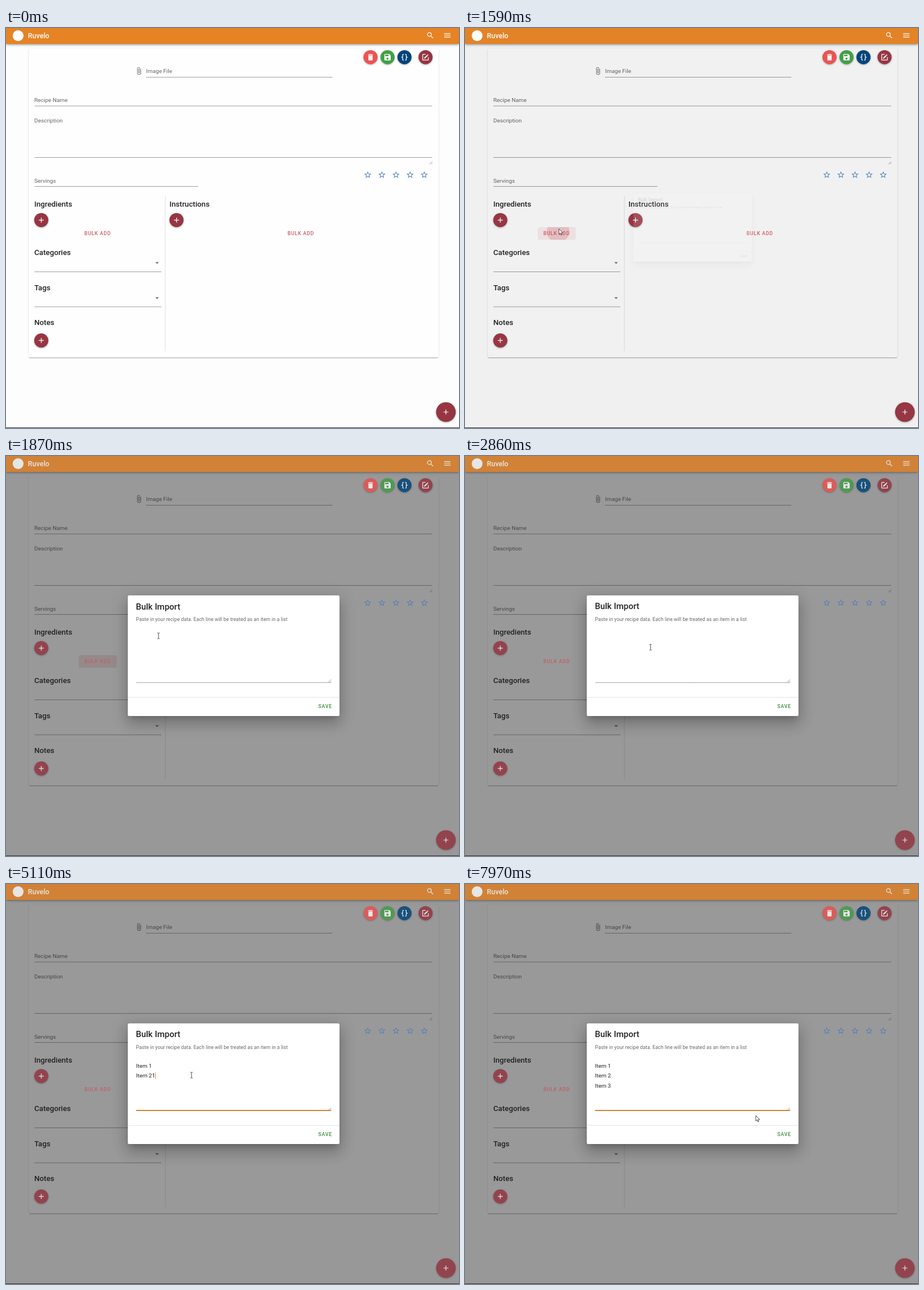
Animation of 796 by 703 pixels, one loop 8000 ms. Source, as an HTML page:

```html
<!DOCTYPE html>
<html lang="en">
<head>
<meta charset="utf-8">
<title>Bulk import</title>
<style>
html, body { margin: 0; width: 100%; height: 100%; overflow: hidden; background: #fdfdfd; }
body { position: relative; font-family: Roboto, sans-serif; }
body > *, #dialog > * { position: absolute; }
svg { left: 0; top: 0; overflow: visible; }
text { font-size: 9.92px; fill: rgba(0,0,0,.6); }
.heading { font-size: 13.2px; font-weight: 500; fill: rgba(0,0,0,.87); }
.button { font-size: 8.68px; font-weight: 500; letter-spacing: .0892em; fill: #d0585f; }
.rule { stroke: rgba(0,0,0,.38); }
.divider { stroke: rgba(0,0,0,.12); }
.fab { filter: drop-shadow(0 1.8px 1.8px rgba(0,0,0,.32)); }
#card { left: 40px; top: 36px; width: 720px; height: 543px; border-radius: 2.5px; background: #fefefe;
  box-shadow: 0 2px .6px -1.2px rgba(0,0,0,.2), 0 1.2px 1.2px rgba(0,0,0,.14), 0 .6px 3px rgba(0,0,0,.12); }
#scrim { inset: 0; background: #212121; }
#vivid { left: 0; top: 0; width: 796px; height: 703px; }
#bar { position: absolute; width: 796px; height: 28px; background: #e58325;
  box-shadow: 0 1.2px 2.5px -.6px rgba(0,0,0,.2), 0 2.5px 3px rgba(0,0,0,.14), 0 .6px 6px rgba(0,0,0,.12); }
#vivid svg { position: absolute; }
#dialog { left: 213.8px; top: 244.8px; width: 372px; height: 212px; border-radius: 2.5px; background: #fff;
  box-shadow: 0 6.8px 9.3px -4.3px rgba(0,0,0,.2), 0 15px 23.5px 2px rgba(0,0,0,.14), 0 5.6px 28.5px 5px rgba(0,0,0,.12); }
#typed { left: 14.7px; top: 66.2px; font-size: 9.92px; line-height: 17.36px; white-space: pre; color: rgba(0,0,0,.87); }
#caret { display: inline-block; position: relative; top: -.7px; width: .8px; height: 12px; margin-right: -.8px;
  vertical-align: middle; background: #d9935c; }
</style>
</head>
<body>
<div id="card"></div>
<svg id="page" width="796" height="703"></svg>
<div id="scrim"></div>
<div id="vivid"><div id="bar"></div><svg id="controls" width="796" height="703"></svg></div>
<div id="dialog">
  <svg id="form" width="372" height="212" viewBox="213.8 244.8 372 212"></svg>
  <div id="typed"><span id="text"></span><span id="caret"></span></div>
</div>
<svg id="top" width="796" height="703">
  <rect y="702" width="796" height="1" fill="#39353b"/>
  <g id="cursor" stroke-linejoin="round">
    <path id="arrow" d="M0 0V9.6L2.2 7.6L3.8 11L5.3 10.4L3.8 7.1H6.9Z" fill="#fff" stroke="#222" stroke-width=".8"/>
    <path id="beam" d="M-2-5H-.6L0-4.4L.6-5H2M0-4.4V4.4M-2 5H-.6L0 4.4L.6 5H2" fill="none" stroke="#333" stroke-width=".9"/>
  </g>
</svg>
<script>
const LOOP = 8000;
const $ = id => document.getElementById(id);

const ICONS = {
  search: 'M9.5 3A6.5 6.5 0 0 1 16 9.5C16 11.11 15.41 12.59 14.44 13.73L14.71 14H15.5L20.5 19L19 20.5L14 15.5V14.71L13.73 14.44A6.5 6.5 0 1 1 9.5 3M9.5 5A4.5 4.5 0 1 0 9.5 14A4.5 4.5 0 1 0 9.5 5Z',
  menu: 'M3 6H21V8H3ZM3 11H21V13H3ZM3 16H21V18H3Z',
  trash: 'M19 4H15.5L14.5 3H9.5L8.5 4H5V6H19M6 19A2 2 0 0 0 8 21H16A2 2 0 0 0 18 19V7H6Z',
  disk: 'M15 9H5V5H15M12 19A3 3 0 0 1 12 13A3 3 0 0 1 12 19M17 3H5A2 2 0 0 0 3 5V19A2 2 0 0 0 5 21H19A2 2 0 0 0 21 19V7Z',
  braces: 'M8 3A2 2 0 0 0 6 5V9A2 2 0 0 1 4 11H3V13H4A2 2 0 0 1 6 15V19A2 2 0 0 0 8 21H10V19H8V14A2 2 0 0 0 6 12A2 2 0 0 0 8 10V5H10V3M16 3A2 2 0 0 1 18 5V9A2 2 0 0 0 20 11H21V13H20A2 2 0 0 0 18 15V19A2 2 0 0 1 16 21H14V19H16V14A2 2 0 0 1 18 12A2 2 0 0 1 16 10V5H14V3Z',
  edit: 'M5 3A2 2 0 0 0 3 5V19A2 2 0 0 0 5 21H19A2 2 0 0 0 21 19V12H19V19H5V5H12V3ZM17.3 4.2L16.08 5.41L18.58 7.91L19.8 6.7Q20.2 6.2 19.8 5.75L18.25 4.2Q17.8 3.8 17.3 4.2M15.37 6.12L8 13.5V16H10.5L17.87 8.62Z',
  clip: 'M16.5 6V17.5A4 4 0 0 1 8.5 17.5V5A2.5 2.5 0 0 1 13.5 5V15.5A1 1 0 0 1 11.5 15.5V6H10V15.5A2.5 2.5 0 0 0 15 15.5V5A4 4 0 0 0 7 5V17.5A5.5 5.5 0 0 0 18 17.5V6Z',
  star: 'M12 15.39L8.24 17.66L9.23 13.38L5.91 10.5L10.29 10.13L12 6.09L13.71 10.13L18.09 10.5L14.77 13.38L15.76 17.66ZM22 9.24L14.81 8.63L12 2L9.19 8.63L2 9.24L7.45 13.97L5.82 21L12 17.27L18.18 21L16.54 13.97Z',
  plus: 'M19 13H13V19H11V13H5V11H11V5H13V11H19Z',
  down: 'M7 10L12 15L17 10Z'
};

const icon = (name, x, y, fill) =>
  `<path d="${ICONS[name]}" fill="${fill}" transform="translate(${x} ${y}) scale(.62) translate(-12 -12)"/>`;
const fab = (x, y, color, name, r = 12.4) =>
  `<circle class="fab" cx="${x}" cy="${y}" r="${r}" fill="${color}"/>` + icon(name, x, y, '#fff');
const label = (x, y, text, cls = '') => `<text x="${x}" y="${y}" class="${cls}">${text}</text>`;
const rule = (x1, x2, y) => `<path class="rule" d="M${x1} ${y}H${x2}"/>`;
const grip = (x, y) => `<path d="M${x - 5} ${y}l5-5M${x - 2} ${y}l2-2" stroke="#777" stroke-width=".7"/>`;

const MAROON = '#973542';

$('page').innerHTML =
  icon('clip', 233.6, 75.5, '#757575') +
  label(246.3, 79.3, 'Image File') + rule(246, 573.5, 86.5) +
  label(49.7, 130, 'Recipe Name') + rule(50, 749, 137) +
  label(49.7, 166.2, 'Description') + rule(50, 749, 227.5) + grip(749, 239.5) +
  label(49.7, 271.9, 'Servings') + rule(50, 338, 278.5) +
  '<path class="divider" d="M280 295V568"/>' +
  label(49.7, 313.7, 'Ingredients', 'heading') +
  label(287.2, 313.7, 'Instructions', 'heading') +
  label(49.7, 399.2, 'Categories', 'heading') + rule(50, 273, 428.5) + icon('down', 265.5, 412.7, '#666') +
  label(49.7, 460.8, 'Tags', 'heading') + rule(50, 273, 490) + icon('down', 265.5, 474.4, '#666') +
  label(49.7, 522.4, 'Notes', 'heading') +
  `<clipPath id="edge"><rect x="127.8" y="350" width="66.8" height="22.2" rx="2.5"/></clipPath>
   <g clip-path="url(#edge)" fill="#d0585f">
     <rect id="hover" x="127" y="349" width="69" height="25"/><circle id="ripple"/>
   </g>`;

$('controls').innerHTML =
  '<circle cx="21.3" cy="13.5" r="9.5" fill="#fff"/>' +
  '<text x="38.6" y="18" style="font-size:12.4px;font-weight:500;fill:#fff">Ruvelo</text>' +
  icon('search', 745.5, 13, '#fff') + icon('menu', 775.5, 13, '#fff') +
  fab(640.5, 51.3, '#ef5350', 'trash') + fab(670.4, 51.3, '#43a047', 'disk') +
  fab(700.2, 51.3, '#00457a', 'braces') + fab(737.2, 51.3, MAROON, 'edit') +
  [0, 1, 2, 3, 4].map(i => icon('star', 635.7 + 24.8 * i, 258, '#4a7ec0')).join('') +
  fab(62, 337.6, MAROON, 'plus') + fab(299.6, 337.6, MAROON, 'plus') + fab(62, 549.2, MAROON, 'plus') +
  fab(773, 675, MAROON, 'plus', 17.3) +
  label(137.7, 364.2, 'BULK ADD', 'button') + label(494.8, 364.2, 'BULK ADD', 'button');

$('form').innerHTML =
  '<text x="228" y="269.3" style="font-size:15px;font-weight:500;fill:rgba(0,0,0,.87)">Bulk Import</text>' +
  '<text x="228.3" y="290" style="font-size:8.68px;letter-spacing:.0071em">Paste in your recipe data. Each line will be treated as an item in a list</text>' +
  rule(228.5, 571, 398) + grip(571, 397.5) +
  '<path id="focus" stroke="#d67d24" stroke-width="1.7"/>' +
  '<path class="divider" d="M213.8 424H585.8"/>' +
  '<text id="save" x="548.6" y="443.2" class="button">SAVE</text>';

const clamp = v => Math.min(1, Math.max(0, v));
const span = (t, from, to) => clamp((t - from) / (to - from));
const smooth = v => v * v * (3 - 2 * v);
const mix = (a, b, k) => a + (b - a) * k;

function bezier(x1, y1, x2, y2) {
  const at = (a, b, u) => 3 * a * u * (1 - u) ** 2 + 3 * b * u * u * (1 - u) + u ** 3;
  return x => {
    let lo = 0, hi = 1;
    for (let i = 0; i < 20; i++) {
      const mid = (lo + hi) / 2;
      if (at(x1, x2, mid) < x) lo = mid; else hi = mid;
    }
    return x >= 1 ? 1 : at(y1, y2, lo);
  };
}
const swift = bezier(.25, .8, .25, 1);
const standard = bezier(.4, 0, .2, 1);

// time, x, y
const POINTER = [
  [10, 800, 706], [260, 537, 584], [470, 537, 584], [1260, 141, 354], [1440, 165, 353], [1680, 165, 353],
  [1870, 268, 316], [2040, 319, 307], [2140, 322, 312], [2530, 322, 312], [2820, 326, 336],
  [7720, 326, 336], [7970, 511, 407]
];
const KEYS = 'Item 1\nItem 21\b\nItem 3';
const KEY_TIMES = [3570, 3650, 3730, 3810, 3920, 4000, 4210, 4590, 4680, 4770, 4860, 4960, 5110, 5110,
  5540, 6030, 6330, 6480, 6560, 6630, 6780, 7030];
const CARET_OFF = [[0, 2870], [3410, 3570], [5650, 6030], [7570, LOOP]];

function pointerAt(t) {
  const i = POINTER.findIndex(p => p[0] > t);
  if (i < 1) return POINTER[i ? POINTER.length - 1 : 0].slice(1);
  const [a, b] = [POINTER[i - 1], POINTER[i]];
  const k = smooth(span(t, a[0], b[0]));
  return [mix(a[1], b[1], k), mix(a[2], b[2], k)];
}

function typedAt(t) {
  let text = '';
  KEY_TIMES.forEach((time, i) => {
    if (time <= t) text = KEYS[i] === '\b' ? text.slice(0, -1) : text + KEYS[i];
  });
  return text;
}

function set(id, attributes) {
  for (const name in attributes) $(id).setAttribute(name, attributes[name]);
}

function draw(t) {
  const open = swift(span(t, 1580, 1880));
  $('scrim').style.opacity = .46 * open;
  $('vivid').style.filter = `contrast(${1 - .2 * open})`;
  $('dialog').style.opacity = open;
  $('dialog').style.transform = `scale(${.5 + .5 * open})`;
  $('save').style.fill = `color-mix(in srgb, #388e3c ${100 * span(t, 1640, 1860)}%, #555)`;

  set('hover', { opacity: .1 * span(t, 1280, 1480) * (1 - span(t, 1600, 1900)) });
  const spread = standard(span(t, 1515, 1765));
  set('ripple', {
    cx: mix(165, 161.2, spread), cy: mix(355, 361, spread), r: 35.2 * (.3 + .7 * spread),
    opacity: .25 * span(t, 1515, 1560) * (1 - span(t, 1770, 2050))
  });

  const half = 171.3 * standard(span(t, 2860, 3160));
  set('focus', { d: half ? `M${399.7 - half} 397.6H${399.7 + half}` : '' });
  $('text').textContent = typedAt(t);
  $('caret').style.visibility = CARET_OFF.some(([a, b]) => t >= a && t < b) ? 'hidden' : 'visible';

  const [x, y] = pointerAt(t);
  const overField = t > 1680 && x > 228 && y < 398;
  set('cursor', { transform: `translate(${x} ${y})` });
  set('arrow', { opacity: overField ? 0 : 1 });
  set('beam', { opacity: overField ? 1 : 0 });
}

function tick() {
  draw(performance.now() % LOOP);
  requestAnimationFrame(tick);
}
tick();
</script>
</body>
</html>
```
